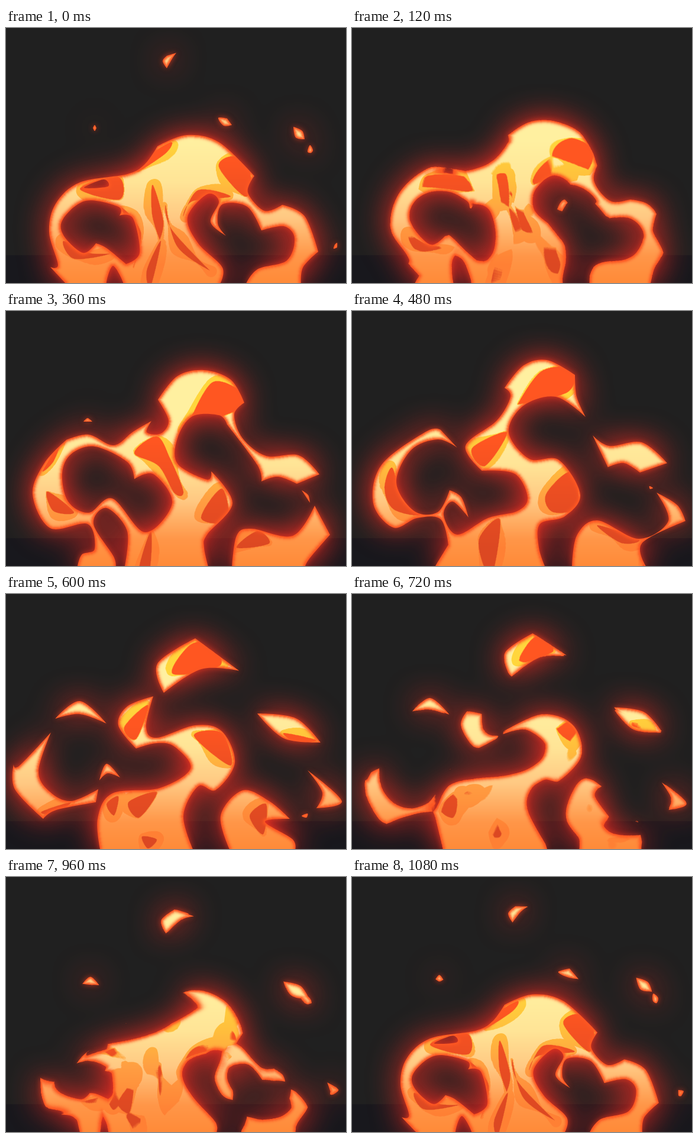
Animation, 575 px wide and 431 px high, one loop 1140 ms. Source, as an HTML page with a canvas:

```html
<!DOCTYPE html>
<html lang="en">
<head>
<meta charset="utf-8">
<title>Fire loop</title>
<style>
html, body { margin: 0; height: 100%; overflow: hidden; background: #202020 }
body { background: linear-gradient(#202020 384px, #18181d 384px) }
canvas { display: block; filter: drop-shadow(0 0 5px #f03a1ec0) drop-shadow(0 0 26px #ff2c24) }
</style>
</head>
<body>
<canvas id="stage" width="575" height="431"></canvas>
<script>
const W = 575, H = 431, STEP = 60, STEPS = 19, FAR = 1e9, CELL = 8, GW = 73, GH = 55;

// Key poses as smooth closed curves: "x,y" points, "!" is a sharp corner, "/" starts a new curve.
const poses = [
  {
    at: 0,
    body: '75,404! 88,400 73,345 84,297 125,261 205,247 235,230 256,200! 305,181 360,193 420,250! 409,278 437,309 467,299! 505,318 528,378! 502,405 499,436! 404,436! 425,408 475,393 488,355 470,335 432,342! 408,302 366,298 358,330 372,351! 346,328 360,293 340,281 307,320 325,364 366,405 360,436! 105,436!/97,350 97,322 135,292 190,302 192,317! 215,322 226,380 203,399! 170,372 152,364! 130,380/170,440 181,402 200,440/132,270 165,256 172,268',
    red: '222,243 270,212 280,193 250,210/360,235 385,217 413,245 405,285/125,272 190,252 192,290/248,265 266,325 260,358! 247,315/300,318 325,274 380,285 315,293/270,300 280,340 345,410! 290,370/195,304 228,345 215,405 222,365/97,360 140,380 175,382 115,390/238,410 262,360 245,436'
  },
  {
    at: 4,
    body: '110,436! 112,422 128,408! 100,376 58,335 70,270 118,220 145,215 195,234! 245,216 272,185 260,170! 295,138 340,130 400,152 415,195! 410,240 440,277 500,283 522,306! 500,340 526,385 508,436! 397,436! 405,388 465,383 499,345 470,307 430,302! 396,277! 413,276 385,238 335,219 300,250 310,290 345,308! 375,350 350,400 352,436! 207,436! 195,388 175,364 162,385 178,436!/99,300 115,268 170,261 214,300! 213,280 250,293 261,345 238,393 200,370 170,332! 135,352/346,293! 358,273 376,276!/98,224! 118,208 139,192! 148,201! 125,205',
    red: '296,235 325,165 385,150 412,195 340,212/98,265 130,232 215,262 150,258/228,235 275,228 262,295! 250,255/283,290 300,285 317,330 295,335/92,335 125,357 150,358 110,367/325,400 365,342 350,436/230,436 260,375 250,436/397,436 402,405 408,436/500,436 526,378 518,425'
  },
  {
    at: 6,
    body: '120,436! 128,412 150,402 138,360 75,367 45,310 65,257 102,218! 140,209 182,227 215,204 246,186! 238,205 262,207 275,185 257,150! 290,110 335,100 380,116 403,155! 386,175 400,215 440,245 495,244 530,276! 492,292! 460,280 432,288! 425,260 374,192! 360,176 315,178 290,215 290,258 340,285 347,271! 383,325 340,378 335,400 343,436! 200,436! 205,372 170,333 148,360 182,415 185,436!/95,275 110,242 150,229 205,255 217,284! 250,276 281,325 235,374 180,317 140,341 105,322/382,436! 390,380 415,368 485,380 522,329! 548,378! 512,420 505,436!/500,303! 511,311 514,324!/131,187! 138,181 146,187!',
    red: '318,170! 350,120 395,135 395,165 300,200!/217,240 255,212 278,250 300,305 285,308 258,262/330,350 365,300 375,355/70,305 115,340 80,338/62,270 92,222 80,255/390,400 425,372 445,393/225,436 245,372 243,436/500,436 547,377 520,410'
  },
  {
    at: 8,
    body: '138,436! 163,395! 150,352 110,350 70,366 36,325 50,260 125,204 150,201! 178,231! 145,217 100,235 75,290 105,338 145,340 165,303! 185,315 197,349! 170,322 155,345 178,378 230,350 280,338 297,315 275,275 220,270! 192,228 245,185 268,145 258,130! 290,92 330,83 377,108! 380,145 395,179! 345,145 290,160 265,205 300,250 350,252 386,310 360,347 318,360 316,400 328,436!/372,436! 380,380 415,354 485,385 535,355 515,307! 550,328 564,355! 490,393 500,436!/407,210! 435,228 490,222 533,257! 487,273! 460,257 433,264!/503,296 509,299 504,301',
    red: '280,158! 320,102 372,98 365,137/203,232 262,205 225,262/328,310 370,272 382,330 340,340/55,300 68,265 85,320 115,345 70,335/215,385 250,352 240,436 225,436/415,362 485,386 455,392/490,436 512,383 500,436'
  },
  {
    at: 10,
    body: '249,173! 237,225 255,243 320,222 365,232 387,285 355,331 325,325 300,375 318,436! 160,436! 155,380 180,337 260,328 312,295 285,258 255,252 220,261! 190,222 205,190/76,234! 55,300 75,335 110,350 156,330! 152,352! 85,365 63,380! 15,330 13,288! 23,290/158,315! 170,287 193,310! 172,303/380,436! 363,375 400,332 445,350 480,380! 438,385 485,415 488,436!/500,375 510,371 508,378',
    red: '282,135 310,87 345,85 362,121/200,225 240,188 220,245/318,240 365,235 380,290/170,355 190,342 183,374/207,352 255,335 225,378/412,375 440,355 435,406/470,235 525,247 490,250/230,410 255,415 240,430/60,368 110,352 80,372'
  },
  {
    at: 14,
    body: '32,320! 65,370 121,366 150,310 215,290 300,280 350,235 305,202 252,222! 325,184 383,212 388,262 342,303! 300,310 293,350 347,425 348,436! 150,436! 122,383 58,399 38,383/190,201! 208,235 240,236! 200,262 179,225/388,436! 396,410 362,375 370,308 400,294 449,348! 415,322 393,345 425,412 485,405 478,385! 503,400 485,436!',
    red: '285,95 305,57 335,60/127,370 165,332 165,380/172,318 188,315 180,330/228,355 250,325 250,398/285,345 310,295 370,278 300,310/370,200 386,222 372,218/360,345 385,308 370,358/470,195 495,205 478,210/168,390 200,385 200,417/430,425 503,400 485,425'
  }
];

// Flakes that drift up and shrink, from one outline to another.
const flakes = [
  [10, '256,118 320,75! 395,130! 330,127 267,167!', '265,56 272,47 288,42! 281,52 272,68!'],
  [10, '425,202! 490,210 532,251! 470,244', '486,167! 501,174 505,188! 490,185'],
  [10, '83,211! 125,181 170,219! 125,203', '147,169! 150,164 153,169! 150,174'],
  [10, '510,298! 568,350 525,362! 535,335', '556,366! 560,363 560,371! 554,373'],
  [17, '335,172 360,157! 385,184! 360,175', '359,152 374,153! 382,164! 368,165'],
  [17, '503,196 516,202 514,216 507,209', '514,198 519,206 516,211 510,209']
].map(([from, a, b]) => ({ from, a: parse(a)[0], b: parse(b)[0] }));

function parse(text) {
  return text.split('/').map(c => c.split(' ').map(p => {
    const [x, y] = p.split(',').map(parseFloat);
    return { x, y, sharp: p.endsWith('!') };
  }));
}

const lerp = (a, b, t) => a + (b - a) * t;
const clamp = (v, lo, hi) => v < lo ? lo : v > hi ? hi : v;

function flakesAt(step) {
  return flakes.filter(f => f.from <= step).map(({ from, a, b }) => {
    const t = ((step - from) / (STEPS - from)) ** .8;
    return a.map((p, i) => ({ x: lerp(p.x, b[i].x, t), y: lerp(p.y, b[i].y, t), sharp: p.sharp }));
  });
}

// Just before the loop closes, the fire is the first pose still squashed.
const squash = curves => curves.map(c => c.map(p =>
  ({ x: 300 + (p.x - 300) * .96, y: H - (H - p.y) * .93, sharp: p.sharp })));

const canvas = document.getElementById('stage'), ctx = canvas.getContext('2d');
const pen = new OffscreenCanvas(W, H).getContext('2d', { willReadFrequently: true });

function trace(pts) {
  const n = pts.length, at = i => pts[(i + n) % n];
  const handle = (i, sign) => {
    const p = at(i), k = p.sharp ? 0 : sign / 6, a = at(i - 1), b = at(i + 1);
    return [p.x + k * (b.x - a.x), p.y + k * (b.y - a.y)];
  };
  pen.moveTo(pts[0].x, pts[0].y);
  for (let i = 0; i < n; i++) pen.bezierCurveTo(...handle(i, 1), ...handle(i + 1, -1), at(i + 1).x, at(i + 1).y);
}

const line = new Float64Array(W), edge = new Float64Array(W + 1), spot = new Int32Array(W);

// Squared distance transform along one row or column.
function sweep(grid, start, gap, n) {
  let k = 0;
  for (let i = 0; i < n; i++) line[i] = grid[start + i * gap];
  spot[0] = 0; edge[0] = -FAR; edge[1] = FAR;
  for (let q = 1; q < n; q++) {
    let s;
    do {
      const r = spot[k];
      s = (line[q] - line[r] + q * q - r * r) / (q - r) / 2;
    } while (s <= edge[k] && --k >= 0);
    spot[++k] = q; edge[k] = s; edge[k + 1] = FAR * FAR;
  }
  k = 0;
  for (let q = 0; q < n; q++) {
    while (edge[k + 1] < q) k++;
    const r = spot[k];
    grid[start + q * gap] = line[r] + (q - r) ** 2;
  }
}

function spread(grid) {
  for (let x = 0; x < W; x++) sweep(grid, x, W, H);
  for (let y = 0; y < H; y++) sweep(grid, y * W, 1, W);
}

// Signed distance to the outlines, negative inside.
function field(curves) {
  pen.clearRect(0, 0, W, H);
  pen.beginPath();
  curves.forEach(trace);
  pen.fill('evenodd');
  const px = pen.getImageData(0, 0, W, H).data;
  const out = new Float64Array(W * H), inside = new Float64Array(W * H);
  for (let i = 0; i < out.length; i++) {
    const a = px[i * 4 + 3] / 255;
    out[i] = a === 1 ? 0 : a === 0 ? FAR : Math.max(0, .5 - a) ** 2;
    inside[i] = a === 0 ? 0 : a === 1 ? FAR : Math.max(0, a - .5) ** 2;
  }
  spread(out);
  spread(inside);
  return Float32Array.from(out, (d, i) => Math.min(60, Math.sqrt(d)) - Math.min(60, Math.sqrt(inside[i])));
}

function sample(f, x, y, w = W, h = H) {
  x = clamp(x, 0, w - 1.01);
  y = clamp(y, 0, h - 1.01);
  const ix = x | 0, iy = y | 0, u = x - ix, v = y - iy, i = iy * w + ix;
  return (f[i] * (1 - u) + f[i + 1] * u) * (1 - v) + (f[i + w] * (1 - u) + f[i + w + 1] * u) * v;
}

function smooth(v) {
  return v.map((_, i) => {
    const x = i % GW, y = (i - x) / GW;
    let sum = 0;
    for (let j = -1; j <= 1; j++) for (let k = -1; k <= 1; k++)
      sum += v[clamp(y + j, 0, GH - 1) * GW + clamp(x + k, 0, GW - 1)];
    return sum / 9;
  });
}

// Smooth motion that carries one distance field onto the next.
function motion(a, b) {
  let vx = new Float32Array(GW * GH), vy = new Float32Array(GW * GH);
  for (let n = 0; n < 60; n++) {
    for (let i = 0; i < vx.length; i++) {
      const x = i % GW * CELL, y = Math.floor(i / GW) * CELL, hx = vx[i] / 2, hy = vy[i] / 2;
      const sum = (ox, oy) => sample(a, x - hx + ox, y - hy + oy) + sample(b, x + hx + ox, y + hy + oy);
      const gx = (sum(4, 0) - sum(-4, 0)) / 16, gy = (sum(0, 4) - sum(0, -4)) / 16;
      const gap = clamp(sample(a, x - hx, y - hy) - sample(b, x + hx, y + hy), -10, 10);
      const k = .5 * gap / (gx * gx + gy * gy + .3);
      vx[i] += k * gx;
      vy[i] += k * gy;
    }
    vx = smooth(smooth(vx));
    vy = smooth(smooth(vy));
  }
  return { vx, vy };
}

// Colour ramps over height: [y, r, g, b].
const ramp = (...stops) => Array.from({ length: H }, (_, y) => {
  const j = stops.findIndex(s => s[0] >= y);
  if (j <= 0) return stops.at(j).slice(1);
  const a = stops[j - 1], b = stops[j], t = (y - a[0]) / (b[0] - a[0]);
  return [1, 2, 3].map(k => lerp(a[k], b[k], t));
});
const base = ramp([190, 255, 240, 160], [260, 255, 228, 150], [320, 255, 200, 130], [385, 255, 150, 72], [431, 255, 138, 56]);
const warm = ramp([190, 255, 214, 60], [260, 255, 190, 60], [320, 255, 158, 66], [400, 255, 128, 52]);
const hot = ramp([220, 255, 86, 33], [300, 236, 78, 34], [400, 220, 72, 34]);
const rim = [252, 86, 34];

function render(a, b, t, loose) {
  const img = new ImageData(W, H), px = img.data;
  for (let y = 34; y < H; y++) for (let x = 0; x < W; x++) {
    const dx = t && sample(a.flow.vx, x / CELL, y / CELL, GW, GH);
    const dy = t && sample(a.flow.vy, x / CELL, y / CELL, GW, GH);
    const mix = name => t
      ? lerp(sample(a[name], x - t * dx, y - t * dy), sample(b[name], x + (1 - t) * dx, y + (1 - t) * dy), t)
      : a[name][y * W + x];
    const depth = -Math.min(mix('shape'), loose ? loose[y * W + x] : FAR);
    if (depth < -.6) continue;
    const red = mix('patch'), r = clamp(.5 - red / 1.5, 0, 1);
    // A wavering yellow band surrounds each red patch.
    const m = clamp(7.5 + 6 * Math.sin(x / 17 + y / 23) - red, 0, 1);
    const e = Math.exp(-((Math.max(0, depth) / 4.4) ** 2)), i = (y * W + x) * 4;
    for (let k = 0; k < 3; k++)
      px[i + k] = lerp(lerp(lerp(base[y][k], warm[y][k], m), hot[y][k], r), rim[k], e);
    px[i + 3] = 255 * clamp(depth + .5, 0, 1);
  }
  return img;
}

for (const p of poses) {
  p.body = parse(p.body);
  p.red = parse(p.red);
}
poses.push({ at: STEPS - 1, body: squash(poses[0].body), red: squash(poses[0].red) });
for (const p of poses) {
  p.shape = field([...p.body, ...flakesAt(p.at || STEPS)]);
  p.patch = field(p.red);
}
poses.slice(0, -1).forEach((p, i) => p.flow = motion(p.shape, poses[i + 1].shape));

const frames = Array.from({ length: STEPS }, (_, s) => {
  const j = poses.findLastIndex(p => p.at <= s), a = poses[j], b = poses[j + 1];
  const t = b ? (s - a.at) / (b.at - a.at) : 0, loose = flakesAt(s);
  return render(a, b, t, t && loose.length ? field(loose) : null);
});

const start = performance.now();
let shown = -1;
function play() {
  const s = Math.floor((performance.now() - start) / STEP) % STEPS;
  if (s !== shown) ctx.putImageData(frames[shown = s], 0, 0);
  requestAnimationFrame(play);
}
play();
</script>
</body>
</html>
```
